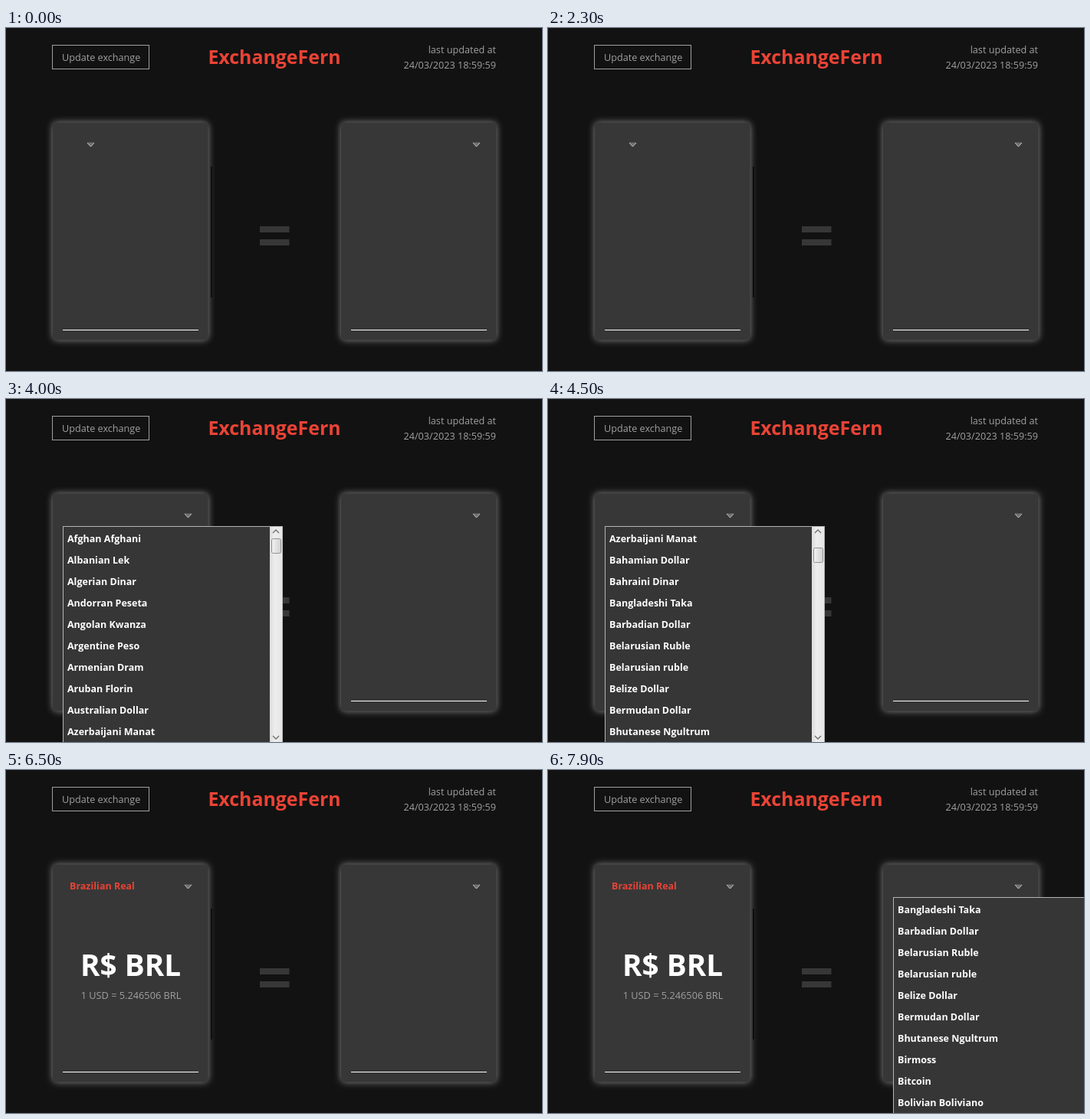
An HTML page with a canvas that plays this animation: 699 by 448 pixels, repeating every 8 s.

```html
<!DOCTYPE html>
<html lang="en">
<head>
<meta charset="utf-8">
<title>Currency converter</title>
<style>
  html, body { margin: 0; width: 100%; height: 100%; overflow: hidden; background: #121212; }
  canvas { display: block; width: 699px; height: 448px; }
</style>
</head>
<body>
<canvas id="stage" width="699" height="448"></canvas>
<script>
const ctx = document.getElementById('stage').getContext('2d');
const LOOP = 8000;
const RED = '#ea4335';
const FAMILY = '"Open Sans", "Noto Sans", sans-serif';
const RIGHT = 376; // offset of the second card
const ROW = 28;

const currencies = [
  'Afghan Afghani', 'Albanian Lek', 'Algerian Dinar', 'Andorran Peseta', 'Angolan Kwanza',
  'Argentine Peso', 'Armenian Dram', 'Aruban Florin', 'Australian Dollar', 'Azerbaijani Manat',
  'Bahamian Dollar', 'Bahraini Dinar', 'Bangladeshi Taka', 'Barbadian Dollar', 'Belarusian Ruble',
  'Belarusian ruble', 'Belize Dollar', 'Bermudan Dollar', 'Bhutanese Ngultrum', 'Birmoss',
  'Bitcoin', 'Bolivian Boliviano', 'Bosnia-Herzegovina Convertible Mark', 'Botswanan Pula',
  'Brazilian Real', 'British Pound Sterling', 'Brunei Dollar', 'Bulgarian Lev', 'Burundian Franc',
  'CFA Franc BCEAO', 'CFA Franc BEAC'
];

// Each entry: start time, first visible row
const leftScroll = [[4000, 0], [4400, 3], [4500, 9], [4800, 12], [4900, 18], [5200, 21]];
const rightScroll = [[7600, 0], [7800, 6], [7900, 12]];

const within = (t, from, to) => t >= from && t < to;

function stepAt(steps, t) {
  let value = steps[0][1];
  for (const [start, v] of steps) if (t >= start) value = v;
  return value;
}

function box(x, y, w, h, color) {
  ctx.fillStyle = color;
  ctx.fillRect(x, y, w, h);
}

function frame(x, y, w, h, color) {
  ctx.strokeStyle = color;
  ctx.lineWidth = 1;
  ctx.strokeRect(x + 0.5, y + 0.5, w - 1, h - 1);
}

function text(str, x, y, size, color, { bold = false, align = 'left' } = {}) {
  ctx.font = `${bold ? 'bold ' : ''}${size}px ${FAMILY}`;
  ctx.textAlign = align;
  ctx.fillStyle = color;
  ctx.fillText(str, x, y);
}

function line(points, color, width) {
  ctx.beginPath();
  points.forEach(([x, y]) => ctx.lineTo(x, y));
  ctx.strokeStyle = color;
  ctx.lineWidth = width;
  ctx.stroke();
}

function header(hover) {
  if (hover) box(60, 22, 127, 32, '#3a3a3a');
  frame(60, 22, 127, 32, '#a0a0a0');
  text('Update exchange', 73, 43, 12.65, '#a0a0a0');
  text('ExchangeFern', 350, 47, 24.9, RED, { bold: true, align: 'center' });
  text('last updated at', 639, 33, 12.65, '#a0a0a0', { align: 'right' });
  text('24/03/2023 18:59:59', 639, 53, 12.65, '#a0a0a0', { align: 'right' });
}

function arrow(x) {
  ctx.beginPath();
  ctx.moveTo(x - 5, 149.5);
  ctx.lineTo(x + 5, 149.5);
  ctx.lineTo(x, 155);
  ctx.fillStyle = '#707070';
  ctx.fill();
  line([[x - 4.5, 150], [x, 155], [x + 4.5, 150]], '#c4c4c4', 1);
}

function card(dx, hover, arrowX) {
  ctx.save();
  ctx.shadowColor = 'rgb(140,140,140)';
  ctx.shadowBlur = 10;
  ctx.beginPath();
  ctx.roundRect(61 + dx, 123.5, 202.5, 284, 5);
  ctx.fillStyle = '#373737';
  ctx.fill();
  ctx.restore();
  if (hover) {
    ctx.strokeStyle = '#848484';
    ctx.lineWidth = 1.7;
    ctx.strokeRect(63.2 + dx, 125.2, 198.8, 280.6);
  }
  arrow(arrowX);
  box(74 + dx, 394, 177, 1, '#ffffff');
}

function rate() {
  text('Brazilian Real', 83, 156, 12.5, RED, { bold: true });
  text('R$ BRL', 162.5, 269, 38.7, '#ffffff', { bold: true, align: 'center' });
  text('1 USD = 5.246506 BRL', 163, 299, 12.75, '#a0a0a0', { align: 'center' });
}

function scrollbar(x, first) {
  const bar = ctx.createLinearGradient(x, 0, x + 16, 0);
  bar.addColorStop(0, '#dcdcdc');
  bar.addColorStop(0.4, '#ededed');
  bar.addColorStop(1, '#e6e6e6');
  box(x, 167, 16, 281, bar);
  const mid = x + 8;
  line([[mid - 4, 175], [mid, 171], [mid + 4, 175]], '#707070', 1.3);
  line([[mid - 4, 440], [mid, 444], [mid + 4, 440]], '#707070', 1.3);

  const y = Math.round(182 + first * 4 / 3);
  const thumb = ctx.createLinearGradient(x + 2, 0, x + 15, 0);
  thumb.addColorStop(0, '#f4f4f4');
  thumb.addColorStop(1, '#cfcfcf');
  ctx.beginPath();
  ctx.roundRect(x + 2.5, y + 0.5, 12, 19, 2);
  ctx.fillStyle = thumb;
  ctx.fill();
  ctx.strokeStyle = '#919191';
  ctx.lineWidth = 1;
  ctx.stroke();
}

function dropdown(dx, first) {
  const x = 74 + dx;
  box(x, 166, 287, 290, '#363636');
  frame(x, 166, 287, 290, '#b4b4b4');
  currencies.slice(first, first + 10).forEach((name, i) =>
    text(name, x + 6, 187 + i * ROW, 12.5, '#ffffff', { bold: true }));
  scrollbar(x + 270, first);
}

function draw(t) {
  const leftOpen = within(t, 4000, 6400);
  const leftHover = within(t, 800, 2300) || within(t, 3200, 4000) || within(t, 6600, 7000);
  const rightHover = within(t, 600, 700) || within(t, 7100, 7600);

  box(0, 0, 699, 448, '#121212');
  header(within(t, 2400, 3100));
  card(0, leftHover, t < 4000 ? 110.5 : 237.5);
  card(RIGHT, rightHover, 613.5);
  box(267, 181, 2, 171, '#0e0e0e');
  box(331, 259, 38.5, 8, '#373737');
  box(331, 276, 38.5, 8, '#373737');

  if (t >= 6400) rate();
  if (leftOpen) dropdown(0, stepAt(leftScroll, t));
  if (t >= 7600) dropdown(RIGHT, stepAt(rightScroll, t));
}

const start = performance.now();
function tick() {
  draw((performance.now() - start) % LOOP);
  requestAnimationFrame(tick);
}
tick();
</script>
</body>
</html>
```
